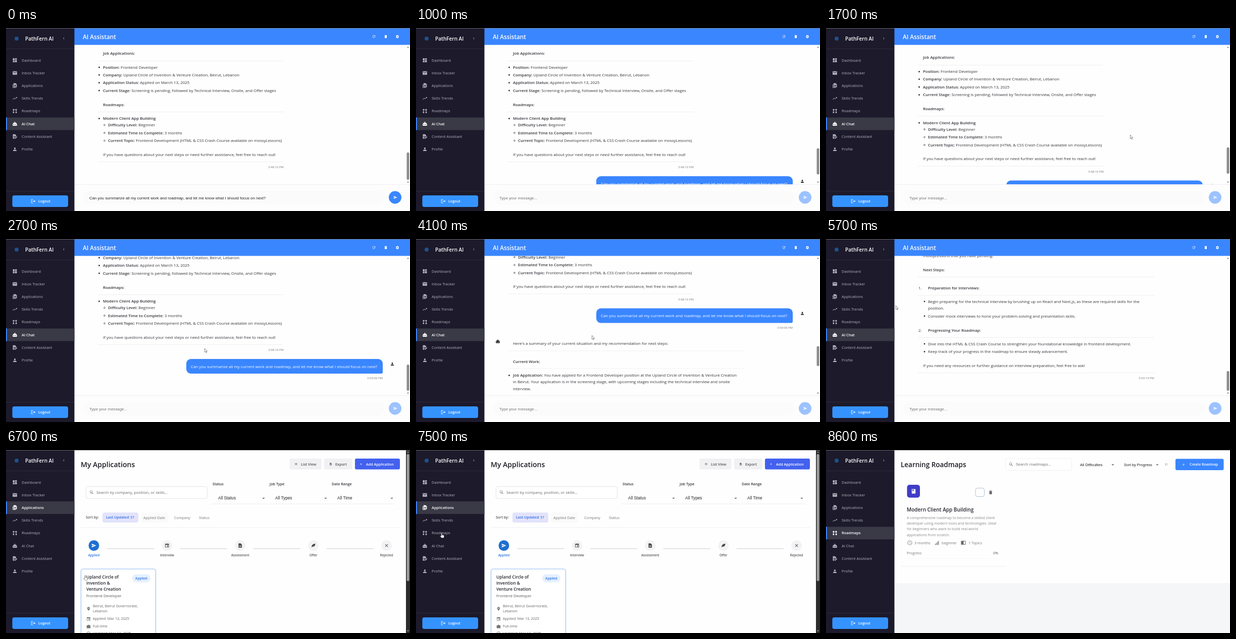
Write an HTML page that moves like this. It is 800 by 363 pixels and loops after 8700 ms.

```html
<!DOCTYPE html>
<html lang="en">
<head>
<meta charset="utf-8">
<title>Assistant walkthrough</title>
<style>
html, body { margin: 0; width: 100%; height: 100%; overflow: hidden; background: #fff; }
svg { display: block; width: 100vw; height: 100vh; }
text { font-family: "Open Sans", "Noto Sans", sans-serif; white-space: pre; }
.form { font-family: "Liberation Sans", Arial, sans-serif; }
.b { font-weight: 600; }
</style>
</head>
<body>
<svg id="stage" viewBox="0 0 800 363"></svg>
<script>
const LOOP = 8700, BLUE = '#3a86ff', INK = '#33343a', GREY = '#777';

// Icons on a 24 x 24 grid
const ICONS = {
  dashboard: 'M3 13h8V3H3zm0 8h8v-6H3zm10 0h8V11h-8zm0-18v6h8V3z',
  mail: 'M2 4h20v16H2zM20 6l-8 5-8-5v2l8 5 8-5z',
  files: 'M4 6H2v16h14v-2H4zM16 1H6v18h15V6zM9 15h9v-2H9zm0-4h9V9H9z',
  trend: 'M16 6l2.3 2.3-4.9 4.9-4-4L2 16.6 3.4 18l6-6 4 4 6.3-6.3L22 12V6z',
  nodes: 'M3 3h6v6H3zm12 0h6v6h-6zM3 15h6v6H3zm12 0h6v6h-6zM5 9h2v6H5zm12 0h2v6h-2zM9 5h6v2H9z',
  robot: 'M12 2a2 2 0 0 1 1 3.7V7h1a7 7 0 0 1 7 7h1v5h-1v2H3v-2H2v-5h1a7 7 0 0 1 7-7h1V5.7A2 2 0 0 1 12 2zM8 13a2 2 0 1 0 0 4 2 2 0 0 0 0-4zm8 0a2 2 0 1 0 0 4 2 2 0 0 0 0-4z',
  doc: 'M4 2h10l6 6v14H4zM7 12v2h10v-2zm0 4v2h10v-2z',
  edit: 'M3 2h10l6 6-9 9v5H3zM6 10v2h7v-2zm0 4v2h4v-2zM12 19l8-8 3 3-8 8h-3z',
  person: 'M12 4a4 4 0 1 1 0 8 4 4 0 0 1 0-8zM4 20v-2c0-3 5-4 8-4s8 1 8 4v2z',
  logout: 'M17 7l-1.4 1.4L18 11H8v2h10l-2.4 2.6L17 17l5-5zM4 5h8V3H2v18h10v-2H4z',
  refresh: 'M17.6 6.4A8 8 0 1 0 19.7 14h-2.1a6 6 0 1 1-1.4-6.2L13 11h7V4z',
  trash: 'M6 7h12v14H6zM19 4h-3.5l-1-1h-5l-1 1H5v2h14z',
  gear: 'M10 2h4l1 3 3-1 3 4-2 3v2l2 3-3 4-3-1-1 3h-4l-1-3-3 1-3-4 2-3v-2L3 8l3-4 3 1zM12 8.5a3.5 3.5 0 1 0 0 7 3.5 3.5 0 0 0 0-7z',
  send: 'M2 21l21-9L2 3v7l15 2-15 2z',
  search: 'M15.5 14h-.8a6.5 6.5 0 1 0-.7.7v.8l5 5 1.5-1.5zM9.5 14a4.5 4.5 0 1 1 0-9 4.5 4.5 0 0 1 0 9z',
  calendar: 'M3 4h18v17H3zM5 9v10h14V9zM7 1h2v3H7zm8 0h2v3h-2zM12 12h5v5h-5z',
  pin: 'M12 2a7 7 0 0 0-7 7c0 5 7 13 7 13s7-8 7-13a7 7 0 0 0-7-7zm0 4.5a2.5 2.5 0 1 1 0 5 2.5 2.5 0 0 1 0-5z',
  bag: 'M8 6V3h8v3h6v15H2V6zM10 5v1h4V5z',
  clock: 'M12 2a10 10 0 1 1 0 20 10 10 0 0 1 0-20zm0 2a8 8 0 1 0 0 16 8 8 0 0 0 0-16zM11 7h1.5v5l4 2.5-.8 1.2L11 13z',
  leaf: 'M3 21c0-10 6-17 18-18 0 10-5 15-14 15l8-9z',
  close: 'M19 6.4L17.6 5 12 10.6 6.4 5 5 6.4l5.6 5.6L5 17.6 6.4 19l5.6-5.6 5.6 5.6 1.4-1.4-5.6-5.6z',
  sort: 'M7 3l4 5H8v12H6V8H3zM14 5h8v2h-8zm0 5h6v2h-6zm0 5h4v2h-4z',
  bars: 'M2 22h3v-5H2zm5 0h3v-9H7zm5 0h3V8h-3zm5 0h3V3h-3z',
  book: 'M2 4h20v16H2zM13 6v12h7V6z',
  bookmark: 'M4 2h16v20H4zM7 4v8l2.5-2 2.5 2V4z',
  plus: 'M11 5h2v6h6v2h-6v6h-2v-6H5v-2h6z',
  list: 'M3 5h18v3H3zm0 5h18v3H3zm0 5h18v3H3z',
  chevron: 'M7 8L12 13l5-5 2 2-7 7-7-7z',
  up: 'M4 17l8-10 8 10z',
  down: 'M4 7l8 10 8-10z'
};

const icon = (name, x, y, size, fill = GREY) =>
  `<path d="${ICONS[name]}" fill="${fill}" fill-rule="evenodd" transform="translate(${x - size / 2} ${y - size / 2}) scale(${size / 24})"/>`;
const rect = (x, y, w, h, fill, r = 0, extra = '') =>
  `<rect x="${x}" y="${y}" width="${w}" height="${h}" rx="${r}" fill="${fill}" ${extra}/>`;
const circle = (x, y, r, fill, extra = '') =>
  `<circle cx="${x}" cy="${y}" r="${r}" fill="${fill}" ${extra}/>`;
const border = color => `stroke="${color}" stroke-width=".8"`;

// y is the middle of the line; *stars* mark bold runs
function text(x, y, string, size = 7.9, fill = INK, extra = '') {
  const runs = string.split('*').map((run, i) => i % 2 ? `<tspan class="b">${run}</tspan>` : run).join('');
  return `<text x="${x}" y="${y + size * .35}" font-size="${size}" fill="${fill}" ${extra}>${runs}</text>`;
}
const END = 'text-anchor="end"', MIDDLE = 'text-anchor="middle"', FORM = 'class="form"';
const lines = (x, ys, strings, size, fill) => strings.map((s, i) => text(x, ys[i], s, size, fill)).join('');
const rule = (y, right) => rect(182, y, right - 182, .8, '#ececef');
const bullet = (y, string) => circle(184.5, y, 1.5, INK) + text(192, y, string);
const subBullet = (y, string, hollow) =>
  circle(195, y, 1.4, hollow ? '#fff' : INK, hollow ? `stroke="${INK}" stroke-width=".7"` : '') + text(202, y, string);
const group = (id, content) => `<g id="${id}">${content}</g>`;

const COURSE = 'Modern Client App Building';
const EVENT = 'Upland Circle of Invention &amp; Venture Creation';
const QUESTION = 'Can you summarize all my current work and roadmap, and let me know what I should focus on next?';

const MENU = [['Dashboard', 'dashboard'], ['Inbox Tracker', 'mail'], ['Applications', 'files'], ['Skills Trends', 'trend'],
  ['Roadmaps', 'nodes'], ['AI Chat', 'robot'], ['Content Assistant', 'edit'], ['Profile', 'person']];
const menuY = i => 64 + i * 25.2;

function sidebar() {
  const item = ([label, name], i, fill, mark = '') =>
    icon(name, 17.5, menuY(i), 10.5, fill) + text(31, menuY(i), mark + label + mark, 7.4, fill);
  return rect(0, 0, 135.5, 363, '#1c1a2b') + circle(21, 21, 4, '#21508a') +
    text(38, 21, '*PathFern AI*', 10, '#fff') + text(113, 20, '‹', 9, '#ccc') +
    rect(0, 41, 135, .8, '#302f40') + rect(0, 323, 135, .8, '#302f40') +
    MENU.map((m, i) => item(m, i, '#b4b3be')).join('') +
    MENU.map((m, i) => group('active' + i, rect(0, menuY(i) - 12.5, 135.5, 25, '#3a3946') +
      rect(0, menuY(i) - 12.5, 2, 25, BLUE) + item(m, i, '#fff', '*'))).join('') +
    rect(12.5, 332, 110.5, 23, '#3593ff', 4) + icon('logout', 54, 343.5, 10, '#fff') + text(64, 343.5, '*Logout*', 7.1, '#fff');
}

const history = text(192, 50, '*Job Applications:*') + rule(65, 548) +
  bullet(78, '*Position:* Frontend Developer') +
  bullet(93, `*Company:* ${EVENT}, Beirut, Lebanon`) +
  bullet(108.5, '*Application Status:* Applied on March 13, 2025') +
  bullet(124, '*Current Stage:* Screening is pending, followed by Technical Interview, Onsite, and Offer stages') +
  text(192, 152, '*Roadmaps:*') + rule(166, 550) +
  bullet(179.5, `*${COURSE}*`) +
  subBullet(192.5, '*Difficulty Level:* Beginner', true) +
  subBullet(208, '*Estimated Time to Complete:* 3 months', true) +
  subBullet(223.5, '*Current Topic:* Frontend Development (HTML &amp; CSS Crash Course available on mossyLessons)', true) +
  text(192, 251, 'If you have questions about your next steps or need further assistance, feel free to reach out!') +
  rule(265, 548) + text(550, 276, '3:48:10 PM', 6, GREY, END);

const question = `<path d="M366 294h371a9 9 0 0 1 9 9v17a3 3 0 0 1-3 3H366a9 9 0 0 1-9-9v-11a9 9 0 0 1 9-9z" fill="${BLUE}"/>` +
  text(366, 309, QUESTION, 7.9, '#fff') + icon('person', 765, 304, 9, '#222') + text(746, 332, '3:50:06 PM', 6, GREY, END);

const answer = icon('robot', 162, 359.5, 9.5, '#222') +
  text(192, 364, 'Here\'s a summary of your current situation and my recommendation for next steps:') + rule(378, 650) +
  text(192, 399.5, '*Current Work:*') + rule(413, 650) +
  bullet(427, `*Job Application:* You have applied for a Frontend Developer position at the ${EVENT}`) +
  lines(192, [440, 453.5], ['in Beirut. Your application is in the screening stage, with upcoming stages including the technical interview and onsite', 'interview.']) +
  text(192, 481, '*Roadmap:*') + rule(495, 650) +
  bullet(509, `*${COURSE}:* You are working on a beginner-level roadmap with an estimated completion time of 3`) +
  lines(192, [522, 535.5], ['months. The current focus area is Frontend Development, and there is an HTML &amp; CSS Crash Course available on', 'mossyLessons that you have pending.']) +
  text(192, 563, '*Next Steps:*') + rule(577, 650) +
  text(183, 599, '1.') + text(202, 599, '*Preparation for Interviews:*') + rule(613, 650) +
  subBullet(626, 'Begin preparing for the technical interview by brushing up on React and Next.js, as these are required skills for the') +
  text(202, 639, 'position.') +
  subBullet(655, 'Consider mock interviews to hone your problem-solving and presentation skills.') +
  text(183, 683, '2.') + text(202, 683, '*Progressing Your Roadmap:*') + rule(697, 650) +
  subBullet(710, 'Dive into the HTML &amp; CSS Crash Course to strengthen your foundational knowledge in frontend development.') +
  subBullet(725.5, 'Keep track of your progress in the roadmap to ensure steady advancement.') +
  text(192, 753, 'If you need any resources or further guidance on interview preparation, feel free to ask!') +
  rule(767, 650) + text(650, 778, '3:50:14 PM', 6, GREY, END);

const chat = rect(135, 0, 665, 363, '#fefefe') +
  group('scroller', history + group('question', question) + group('answer', answer)) +
  rect(135, 0, 665, 33.5, BLUE) + text(152, 17.5, '*AI Assistant*', 11.7, '#fff') +
  icon('refresh', 728.5, 17, 8, '#fff') + icon('trash', 752, 17, 8, '#fff') + icon('gear', 775, 17, 7.5, '#fff') +
  icon('up', 796, 38, 6) + icon('down', 796, 306, 6) + rect(793.5, 0, 5, 0, '#8b8b8b', 2.5, 'id="thumb"') +
  rect(135, 310, 665, 53, '#fdfdfd') + rect(135, 310, 665, .8, '#ececf0') +
  rect(153, 323, 596, 27, '#fbfbfb', 12) +
  group('typed', text(165, 337, QUESTION, 7.85, '#222', FORM)) +
  group('placeholder', text(165, 337, 'Type your message...', 7.85, '#757575', FORM)) +
  circle(770.5, 336, 12.5, BLUE, 'id="send"') + icon('send', 771, 336, 8, '#fff');

const select = (x, width, label) => rect(x, 106.5, width, .8, '#e9e9ec') +
  text(x + 14, 95.5, label, 8.3, '#222', FORM) + icon('chevron', x + width - 7, 95.5, 7, '#222');
const searchBox = (x, y, width, label, edge) => rect(x, y, width, 23.5, '#fff', 3, border(edge)) +
  icon('search', x + 11, y + 11.5, 10) + text(x + 20.5, y + 11.5, label, 7.8, '#666');
const STEPS = [['Applied', 'send'], ['Interview', 'calendar'], ['Assessment', 'doc'], ['Offer', 'leaf'], ['Rejected', 'close']];

const applications = rect(135, 0, 665, 363, '#fefefe') +
  text(148, 29, '*My Applications*', 14, '#1c1c24') +
  rect(561.5, 17, 63, 21.5, '#f1f1f3', 3) + icon('list', 574.5, 28, 6) + text(584, 28, '*List View*', 7.2, '#555') +
  rect(630, 17, 56, 21.5, '#f1f1f3', 3) + icon('doc', 643, 28, 6) + text(652, 28, '*Export*', 7.2, '#555') +
  rect(691, 17, 89, 21.5, '#4361ee', 3) + icon('plus', 703, 28, 7, '#fff') + text(713, 28, '*Add Application*', 7.2, '#fff') +
  rect(148, 153.5, 632, .8, '#ececef') +
  searchBox(158.5, 72.5, 240, 'Search by company, position, or skills...', '#dcdce0') +
  text(409, 67.5, '*Status*', 7.2) + text(522, 67.5, '*Job Type*', 7.2) + text(645, 67.5, '*Date Range*', 7.2) +
  select(406, 111, 'All Status') + select(519, 121, 'All Types') + select(642, 129, 'All Time') +
  text(158, 134, '*Sort by:*', 7, '#555') +
  rect(191, 124, 71, 20, '#e2e3fb', 4) + text(198, 134, '*Last Updated*', 7.1, '#326de0') + icon('sort', 250, 134, 9, '#326de0') +
  rect(267, 124, 54, 20, '#fafafa', 4) + text(272, 134, 'Applied Date', 7.2, GREY) +
  text(333, 134, 'Company', 7.2, GREY) + text(382, 134, 'Status', 7.2, GREY) +
  STEPS.map(([label, name], i) => {
    const x = 174 + i * 144.9, first = i === 0;
    return (i < 4 ? rect(x + 26, 195, 93, 1.3, '#d6d6da') : '') +
      circle(x, 189.5, 10.5, first ? '#1f6fd0' : '#f3f3f5') + icon(name, x, 189.5, 10, first ? '#fff' : '#444') +
      text(x, 209, `*${label}*`, 6.2, first ? '#2f74e0' : '#555', MIDDLE);
  }).join('') +
  rect(148.5, 236, 148, 150, '#fff', 4, border('#6ea6f3')) +
  lines(159, [252.5, 264.5, 276.5], ['*Upland Circle of*', '*Invention &amp;*', '*Venture Creation*'], 8.4, '#24242c') +
  rect(250, 246.5, 36, 16, '#e5f0fe', 8) + text(268, 254.5, '*Applied*', 6.5, '#2f74e0', MIDDLE) +
  text(159, 289, 'Frontend Developer', 7.5, '#555') +
  lines(172, [310, 319.5, 335, 350, 364], ['Beirut, Beirut Governorate,', 'Lebanon', 'Applied: Mar 13, 2025', 'Full-time', 'Updated: Mar 13, 2025'], 7.1, '#666') +
  ['pin', 'calendar', 'bag', 'clock'].map((name, i) => icon(name, 163.5, [315, 335, 350, 364][i], 9)).join('') +
  rect(792, 0, 8, 363, '#2b2b2b') + icon('up', 796, 4, 6, '#9f9f9f') + icon('down', 796, 359, 6, '#9f9f9f') +
  rect(793.5, 8, 5, 252, '#9f9f9f', 2.5);

const roadmaps = rect(135, 0, 665, 264, '#fefefe') + rect(135, 264, 665, 99, '#f4f6f8') +
  text(148, 29.5, '*Learning Roadmaps*', 13.5, '#1c1c24') +
  searchBox(355.5, 17, 131, 'Search roadmaps...', '#ececef') +
  text(503, 29, 'All Difficulties', 7.5, '#222', FORM) + icon('chevron', 568, 29, 7, '#222') +
  text(590, 29, 'Sort by Progress', 7.5, '#222', FORM) + icon('chevron', 656, 29, 7, '#222') + icon('sort', 674, 29, 7) +
  rect(692, 17.5, 95.5, 22.5, BLUE, 3) + icon('plus', 708, 29, 8, '#fff') + text(720, 29, '*Create Roadmap*', 7, '#fff') +
  rect(148, 230.5, 207, .8, '#ebebee') +
  rect(160.5, 69, 25.5, 25.5, '#403dc6', 5) + icon('bookmark', 173.5, 82, 11, '#fff') +
  rect(296, 75.5, 17.5, 17, '#fff', 4, border('#9ab0c8')) + icon('trash', 326, 84, 10, '#666') +
  text(160, 118, `*${COURSE}*`, 10, '#24242c') +
  lines(160, [134.5, 145.5, 157, 168.5], ['A comprehensive roadmap to become a skilled client', 'developer using modern tools and technologies. Ideal', 'for beginners who want to build real-world', 'applications from scratch.'], 7.1, '#888') +
  icon('clock', 166, 184, 11) + text(175, 184, '3 months', 7.2, GREY) +
  icon('bars', 220, 184, 10) + text(229, 184, 'beginner', 7.2, GREY) +
  icon('book', 272, 184, 11, '#666') + text(282, 184, '1 Topics', 7.2, GREY) +
  text(160, 204, 'Progress', 7.2, GREY) + text(341, 204, '0%', 7.2, '#555', END) + rect(160, 215, 181, 1, '#f7f7f9');

const arrow = '<path d="M0 0v7.5l1.7-1.5 1.3 2.8 1.2-.6-1.300-2.700h2.300z" fill="#fff" stroke="#444" stroke-width=".6"/>';
const hand = '<path d="M0 0q1-1 1.600 0v3.500l4 .8v3l-1 2H.500l-2.800-3.500 1-.7L0 6z" fill="#fff" stroke="#444" stroke-width=".6"/>';

document.getElementById('stage').innerHTML = group('chat', chat) + group('applications', applications) +
  group('roadmaps', roadmaps) + sidebar() + rect(0, 0, 800, .8, '#777') +
  group('cursor', group('arrow', arrow) + group('hand', hand));

const node = id => document.getElementById(id);
const show = (id, on) => node(id).setAttribute('visibility', on ? 'inherit' : 'hidden');

// Linear interpolation through [time, value] keys
function track(keys, t) {
  const next = keys.findIndex(([time]) => time > t);
  if (next < 0) return keys[keys.length - 1][1];
  if (next === 0) return keys[0][1];
  const [t0, a] = keys[next - 1], [t1, b] = keys[next];
  return a + (b - a) * (t - t0) / (t1 - t0);
}

const SCROLL = [[1200, 0], [1700, -8.5], [1900, -8.5], [2500, 56], [3600, 56], [4700, 277], [5500, 502]];
const CURSOR_X = [[1000, 770], [1700, 602.5], [2700, 393.5], [3600, 370], [4700, 322.5], [5200, 300], [5700, 138], [6000, 60], [6200, 60], [6700, 156], [7000, 156], [7500, 50]];
const CURSOR_Y = [[1000, 334], [1700, 212], [2700, 217], [3600, 200], [4700, 181], [5200, 180], [5700, 132], [6000, 115], [6200, 115], [6700, 249], [7000, 249], [7500, 165]];
const SENT = 1000, ANSWERED = 3500, TO_APPLICATIONS = 6100, TO_ROADMAPS = 7600;

function render(t) {
  const page = t < TO_APPLICATIONS ? 'chat' : t < TO_ROADMAPS ? 'applications' : 'roadmaps';
  for (const id of ['chat', 'applications', 'roadmaps']) node(id).style.display = id === page ? '' : 'none';
  const active = { chat: 5, applications: 2, roadmaps: 4 }[page];
  MENU.forEach((_, i) => show('active' + i, i === active));

  const sent = t >= SENT, answered = t >= ANSWERED;
  show('question', sent);
  show('answer', answered);
  show('typed', !sent);
  show('placeholder', sent);
  node('send').setAttribute('fill', sent ? '#9cc2ff' : BLUE);

  const scroll = track(SCROLL, t), total = answered ? 1830 : sent ? 1384 : 1328;
  node('scroller').setAttribute('transform', `translate(0 ${-scroll})`);
  node('thumb').setAttribute('y', 41 + 260 * (scroll + 1051) / total);
  node('thumb').setAttribute('height', 260 * 277 / total);

  const x = track(CURSOR_X, t), pointing = page !== 'chat' || x < 130;
  show('cursor', t >= 1200 && t < 8200);
  show('arrow', !pointing);
  show('hand', pointing);
  node('cursor').setAttribute('transform', `translate(${x} ${track(CURSOR_Y, t)})`);
}

function tick() {
  render(Math.floor(performance.now() % LOOP / 100) * 100);
  requestAnimationFrame(tick);
}
tick();
</script>
</body>
</html>
```
